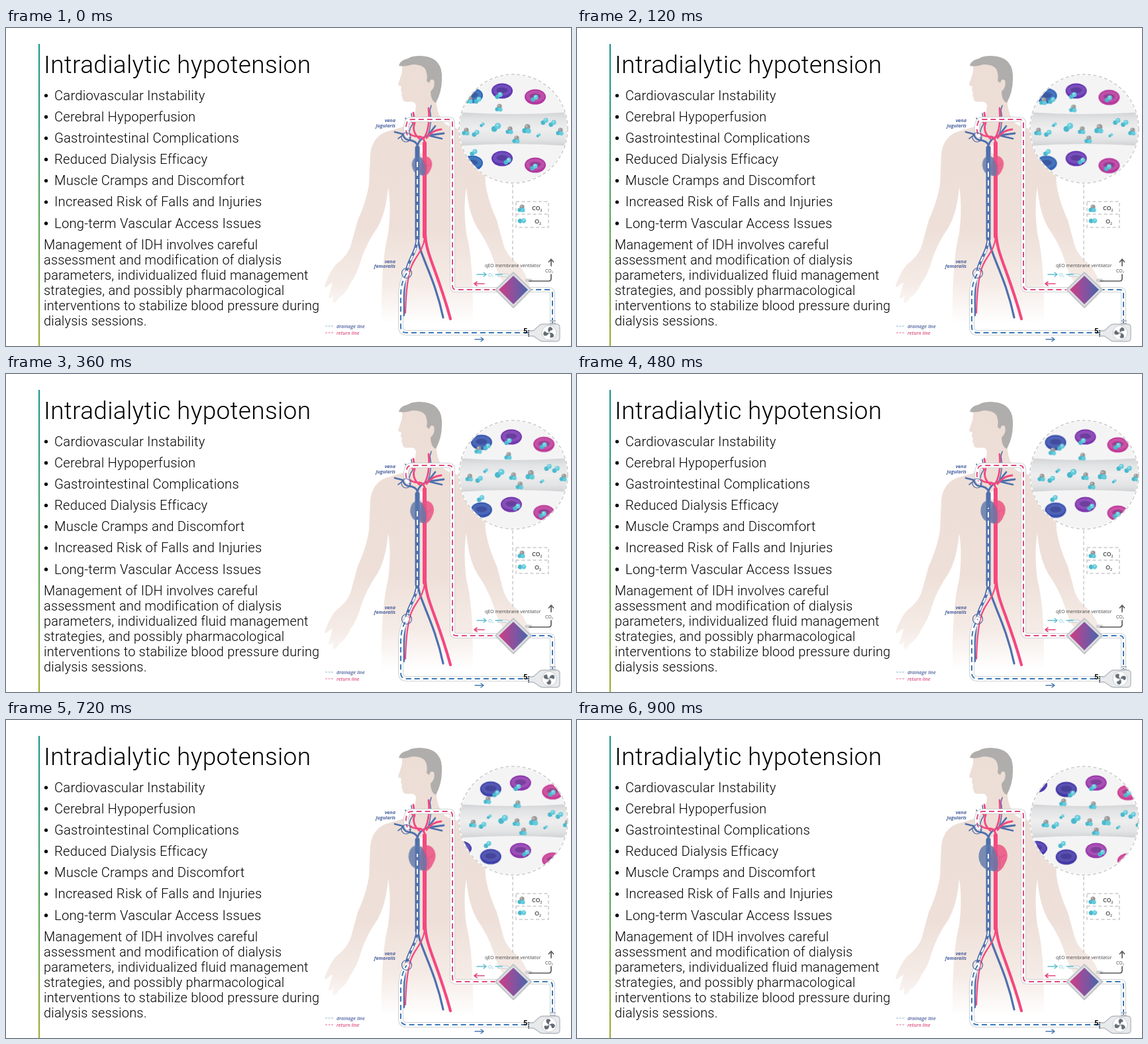
Write an HTML page that moves like this. It is 853 px wide and 480 px high and loops after 960 ms.

```html
<!DOCTYPE html>
<html lang="en">
<head>
<meta charset="utf-8">
<title>Intradialytic hypotension</title>
<style>
  html, body { margin: 0; width: 100%; height: 100%; overflow: hidden; background: #fff; }
  svg { display: block; width: 100vw; height: 100vh; font-family: Roboto, Inter, sans-serif; }
  .title { font-size: 37px; font-weight: 300; letter-spacing: .32px; }
  .list, .para { font-weight: 300; letter-spacing: .23px; }
  .list { font-size: 20.2px; }
  .para { font-size: 19.9px; }
  .label { font: italic 600 7.2px "Open Sans", "Noto Sans", sans-serif; fill: #4a619d; }
  .label .strong { font-weight: 700; }
  .tag { font: 7px "Open Sans", "Noto Sans", sans-serif; fill: #444; }

  .line { fill: none; stroke-linecap: round; stroke-linejoin: round; }
  .blue { stroke: #4f70ad; }
  .red { stroke: #f5477f; }
  .shell { stroke: #cfd1d3; stroke-width: 8; }
  .bore { stroke: #fff; stroke-width: 6; }
  .flow { stroke-width: 2; stroke-linecap: butt; stroke-dasharray: 8 5; }
  .drain { stroke: #3c79b6; }
  .return { stroke: #e04a7e; }
  .dots { fill: none; stroke: #cacaca; stroke-width: 1.5; stroke-dasharray: 5 3.5; }

  .go, .flow, .beat, .fan, .cell { animation: 960ms steps(16) infinite; }
  .go { animation-name: go; }
  .flow { animation-name: flow; }
  .beat { animation-name: beat; transform-origin: 628px 208px; }
  .fan { animation-name: fan; transform-origin: 820px 460px; }
  .cell { animation-name: tint; }
  @keyframes go { to { transform: translate(var(--x, 14px), var(--y, 0px)); } }
  @keyframes flow { to { stroke-dashoffset: -13px; } }
  @keyframes beat { from { transform: scale(.71); } to { transform: scale(1.02); } }
  @keyframes fan { to { transform: rotate(120deg); } }
  @keyframes tint { from { fill: var(--a); } to { fill: var(--b); } }
  .c0 { --a: #3d59b5; --b: #4a35ad; }
  .c1 { --a: #2b66b6; --b: #4435a4; }
  .c2 { --a: #5e36b2; --b: #9f38ab; }
  .c3 { --a: #b4389f; --b: #cf3f92; }
</style>
</head>
<body>
<svg viewBox="0 0 853 480">
  <defs>
    <linearGradient id="rule" x2="0" y2="1">
      <stop stop-color="#12938c"/><stop offset=".5" stop-color="#4aa25c"/><stop offset="1" stop-color="#9aad2c"/>
    </linearGradient>
    <linearGradient id="skin" gradientUnits="userSpaceOnUse" x1="0" y1="40" x2="0" y2="446">
      <stop stop-color="#ecddd5"/><stop offset=".65" stop-color="#eee0d9"/>
      <stop offset=".85" stop-color="#f5ebe6"/><stop offset="1" stop-color="#fff"/>
    </linearGradient>
    <linearGradient id="wall" x2="0" y2="1">
      <stop stop-color="#d2d3d5"/><stop offset=".2" stop-color="#e2e3e4"/><stop offset=".5" stop-color="#eeeeef"/>
      <stop offset=".82" stop-color="#e2e3e4"/><stop offset="1" stop-color="#d0d1d3"/>
    </linearGradient>
    <linearGradient id="membrane" gradientUnits="userSpaceOnUse" x1="746" y1="0" x2="788" y2="0">
      <stop stop-color="#cb3f87"/><stop offset=".5" stop-color="#87529f"/><stop offset="1" stop-color="#4767a9"/>
    </linearGradient>
    <clipPath id="lens"><circle cx="766" cy="152" r="81"/></clipPath>

    <g id="o2"><circle cx="-2.2" cy="1.8" r="3.4" fill="#4ab7cc"/><circle cx="2" cy="-1.6" r="3.6" fill="#64ccdc"/><circle cx="1.4" cy="-2.6" r="1.3" fill="#a5e3eb"/></g>
    <g id="co2"><circle cx="1" cy="-3" r="3.6" fill="#989796"/><circle cx="0" cy="-4" r="1.4" fill="#bbb"/><circle cx="-2.4" cy="1.6" r="3.2" fill="#4ab8cc"/><circle cx="2.4" cy="2" r="3.2" fill="#64ccdc"/></g>
    <g id="cell">
      <ellipse rx="16" ry="11.5"/>
      <ellipse cy="-1" rx="14" ry="8.5" fill="#fff" opacity=".12"/>
      <ellipse cy="-1" rx="8.5" ry="4.2" fill="#120a55" opacity=".25"/>
    </g>

    <path id="half" d="M640 132H617Q615 144 600 149L573 157Q553 165 550 190L548 236Q544 262 531 290L521 327Q516 344 498 357Q488 369 481 389Q481 394 487 388L493 384L487 406Q488 412 494 404L493 414Q498 417 503 407Q513 401 520 385Q530 372 536 350Q544 325 561 301Q574 278 577 240Q582 270 577 310Q566 351 567 446H640Z"/>
    <path id="in" d="M606 162Q602 153 605 144Q606 138 613 138H668Q674 138 674 144V389Q674 395 680 395H744"/>
    <path id="inner" d="M621 202V318C621 339 607 349 605 370"/>
    <path id="out" d="M605 370Q596 384 596 404V451Q596 460 605 460H794"/>
    <path id="feed" d="M787 395H819Q825 395 825 401V446"/>
  </defs>

  <rect x="49" y="24" width="2" height="456" fill="url(#rule)"/>

  <!-- body -->
  <g fill="url(#skin)">
    <use href="#half"/>
    <use href="#half" transform="matrix(-1 0 0 1 1272 0)"/>
    <path d="M598 55Q599 66 596 73L592 85Q593 88 597 88L596 94L598 98L597 102Q599 104 599 108Q601 113 611 111Q618 111 619 117L616 140H658Q650 127 649 104L652 62L630 48Z"/>
  </g>
  <path d="M593 57Q594 49 607 46Q612 42 626 42Q645 43 652 53Q659 61 658 78Q658 96 649 113Q641 110 641 96Q649 88 646 79Q641 75 639 83L635 80Q637 70 633 62Q628 55 614 55Q602 59 593 57Z" fill="#b0aeac"/>

  <!-- vessels -->
  <g class="line blue">
    <path d="M621 181V318" stroke-width="7"/>
    <path d="M621 316C620 340 606 350 604 371Q599 390 600 433" stroke-width="4.5"/>
    <path d="M622 318C623 340 647 375 660 437" stroke-width="3.2"/>
    <path d="M621 191V177Q619 170 607 169Q601 168 599 160L587 157M621 178Q624 166 638 162L661 159M637 162L648 148M637 162Q649 165 658 167" stroke-width="2.8"/>
    <path d="M610 168Q606 155 614 145L612 129M637 162Q644 142 640 124L642 117M600 161L592 167M608 145L603 136" stroke-width="1.6"/>
  </g>
  <g class="line red">
    <path d="M632 174V315" stroke-width="6"/>
    <path d="M633 312C634 342 651 366 671 439" stroke-width="4.2"/>
    <path d="M632 316C630 340 613 347 609 370Q604 391 603 430" stroke-width="2.2"/>
    <path d="M633 207V178Q632 164 624 164Q611 164 606 156M624 167Q612 157 617 143L615 128M630 168Q641 152 638 121M635 166Q643 154 657 153" stroke-width="2.8"/>
    <path d="M617 145L608 139M638 143L645 135" stroke-width="1.6"/>
  </g>

  <g class="beat">
    <path d="M628 192Q636 184 645 192Q654 203 646 217Q642 228 631 231Q622 224 624 207Z" fill="#ed5283" opacity=".85"/>
    <path d="M628 191Q616 184 609 195Q603 208 611 220Q619 229 634 228Q640 213 628 191Z" fill="#6079aa" opacity=".82"/>
    <path class="line" d="M630 196Q641 207 638 224M637 209L646 204" stroke="#b23a71" stroke-width="1" opacity=".4"/>
  </g>
  <path class="line" d="M627 178V188" stroke="#fff" stroke-width="3"/>
  <path class="line blue" d="M621 194V318" stroke-width="5" opacity=".6"/>

  <!-- tubing -->
  <g class="line">
    <use href="#inner" class="flow" stroke="#fff"/>
    <g class="shell"><use href="#in"/><use href="#out"/><use href="#feed"/></g>
    <g class="bore"><use href="#in"/><use href="#out"/><use href="#feed"/></g>
    <use href="#in" class="flow return"/>
    <use href="#out" class="flow drain"/>
    <use href="#feed" class="flow drain"/>
    <g stroke="#4d69a3" stroke-width="1.2"><circle cx="604" cy="165" r="7"/><circle cx="605" cy="370" r="7.5"/></g>
  </g>

  <g class="label">
    <g class="strong" text-anchor="end">
      <text x="588" y="142">vena</text><text x="588" y="150">jugularis</text>
      <text x="588" y="355">vena</text><text x="588" y="362">femoralis</text>
    </g>
    <text x="499" y="453">drainage line</text>
    <text x="499" y="463" style="fill:#dd4c80">return line</text>
  </g>
  <g stroke-width="1.2" stroke-dasharray="3 1.5">
    <path d="M482 450H495" stroke="#8fb7d3"/><path d="M482 460H495" stroke="#e8719a"/>
  </g>

  <!-- magnified exchange -->
  <path class="dots" d="M765 236V354"/>
  <circle cx="766" cy="152" r="83" fill="#fff"/>
  <g clip-path="url(#lens)">
    <circle cx="766" cy="152" r="81" fill="#f4f4f5"/>
    <path d="M680 127Q766 133 852 127V178Q766 172 680 178Z" fill="url(#wall)"/>
    <g class="go" style="--x:37px">
      <use href="#cell" class="cell c0" x="659" y="98"/>
      <use href="#cell" class="cell c0" x="659" y="194"/>
    </g>
    <g class="go" style="--x:37px;--y:3px">
      <use href="#cell" class="cell c1" x="704" y="102"/>
      <use href="#cell" class="cell c1" x="704" y="204"/>
      <use href="#o2" x="712" y="109"/>
    </g>
    <g class="go" style="--x:37px">
      <use href="#cell" class="cell c2" x="749" y="95"/>
      <use href="#cell" class="cell c2" x="749" y="197"/>
      <use href="#o2" x="744" y="102"/><use href="#o2" x="757" y="201"/>
    </g>
    <g class="go" style="--x:35px;--y:6px">
      <use href="#cell" class="cell c3" x="799" y="104"/>
      <use href="#cell" class="cell c3" x="799" y="207"/>
      <use href="#o2" x="798" y="106"/><use href="#o2" x="797" y="210"/>
    </g>
    <use href="#co2" class="go" style="--x:37px;--y:9px" x="744" y="121"/>
    <use href="#co2" class="go" style="--x:37px;--y:17px" x="699" y="109"/>
    <use href="#o2" class="go" style="--x:28px" x="706" y="188"/>
    <g class="go">
      <use href="#co2" x="694" y="157"/><use href="#o2" x="709" y="159"/>
      <use href="#o2" transform="translate(740 150) scale(1.3)"/>
      <use href="#o2" transform="translate(719 146) scale(.65)"/>
      <use href="#co2" x="760" y="155"/>
      <use href="#co2" x="770" y="169"/>
      <use href="#co2" transform="translate(786 153) scale(1.2)"/>
      <use href="#o2" x="813" y="141"/><use href="#o2" x="825" y="144"/>
      <use href="#co2" x="836" y="157"/>
      <use href="#o2" transform="translate(804 162) scale(.6)"/>
    </g>
  </g>
  <circle class="dots" cx="766" cy="152" r="82"/>

  <!-- legend -->
  <path class="dots" d="M770 262H819V301H770ZM770 281H819"/>
  <use href="#co2" x="778" y="273"/>
  <use href="#o2" transform="translate(779 291) rotate(35)"/>
  <g class="tag" style="font-size:9px;font-weight:600">
    <text x="794" y="275">CO<tspan font-size="5" dy="2">2</tspan></text>
    <text x="798" y="295">O<tspan font-size="5" dy="2">2</tspan></text>
  </g>

  <!-- membrane unit -->
  <text class="tag" x="723" y="361">qEO membrane ventilator</text>
  <g class="line">
    <path d="M744 373H756L765 380M786 381H792" stroke="#cfd1d3" stroke-width="5"/>
    <path d="M744 373H756L765 380" stroke="#eaf5f8" stroke-width="2.5"/>
    <path d="M790 382H819Q823 382 823 378V372M823 359V350M819.5 353L823 349L826.5 353" stroke="#5c5c5c" stroke-width="1.7"/>
    <path d="M711 372H724M721 369L725 372L721 375M739 372H749" stroke="#5fbfd0" stroke-width="1.5"/>
    <path d="M722 386H707M711 383L707 386L711 389" stroke="#e4497f" stroke-width="1.6"/>
    <path d="M708 470H721M717 467L721 470L717 473" stroke="#4b78b1" stroke-width="1.5"/>
  </g>
  <g class="tag">
    <text x="728" y="375" style="fill:#5fbfd0">O<tspan font-size="4" dy="1">2</tspan></text>
    <text x="814" y="369">CO<tspan font-size="4" dy="1">2</tspan></text>
  </g>
  <path d="M766 369L793 395L766 422L739 395Z" fill="#dcdee0" stroke="#c3c6c9" stroke-width="2" stroke-linejoin="round"/>
  <path d="M766 374L788 395L766 417L744 395Z" fill="url(#membrane)"/>

  <!-- pump -->
  <path d="M789 457H796L805 449Q807 447 811 447H831Q836 447 836 452V468Q836 473 831 473H811Q807 473 805 471L796 465H789Z" fill="#e8eaec" stroke="#b6bbc0" stroke-width="1.4"/>
  <path d="M821 446H830M821 442H830" stroke="#b6bbc0" stroke-width="2"/>
  <path d="M789 456V466" stroke="#56646f" stroke-width="2" stroke-dasharray="2 1"/>
  <circle cx="820" cy="460" r="11" fill="#fff" stroke="#c9cdd0"/>
  <g class="fan" fill="#636c74">
    <path id="blade" d="M820 460Q816 454 821 451Q826 452 825 456Q821 456 820 460Z"/>
    <use href="#blade" transform="rotate(120 820 460)"/>
    <use href="#blade" transform="rotate(240 820 460)"/>
  </g>
  <text x="781" y="461" style="font:bold 11px Roboto, sans-serif">5</text>

  <!-- copy -->
  <text class="title" x="57" y="68">Intradialytic hypotension</text>
  <path d="M60.5 102V296" stroke="#000" stroke-width="5.2" stroke-linecap="round" stroke-dasharray="0 32.15"/>
  <g class="list">
    <text x="73" y="109">Cardiovascular Instability</text>
    <text x="73" y="141">Cerebral Hypoperfusion</text>
    <text x="73" y="173">Gastrointestinal Complications</text>
    <text x="73" y="205">Reduced Dialysis Efficacy</text>
    <text x="73" y="237">Muscle Cramps and Discomfort</text>
    <text x="73" y="269">Increased Risk of Falls and Injuries</text>
    <text x="73" y="302">Long-term Vascular Access Issues</text>
  </g>
  <g class="para">
    <text x="57" y="334">Management of IDH involves careful</text>
    <text x="57" y="357">assessment and modification of dialysis</text>
    <text x="57" y="380">parameters, individualized fluid management</text>
    <text x="57" y="403">strategies, and possibly pharmacological</text>
    <text x="57" y="426">interventions to stabilize blood pressure during</text>
    <text x="57" y="449">dialysis sessions.</text>
  </g>
</svg>
</body>
</html>
```
